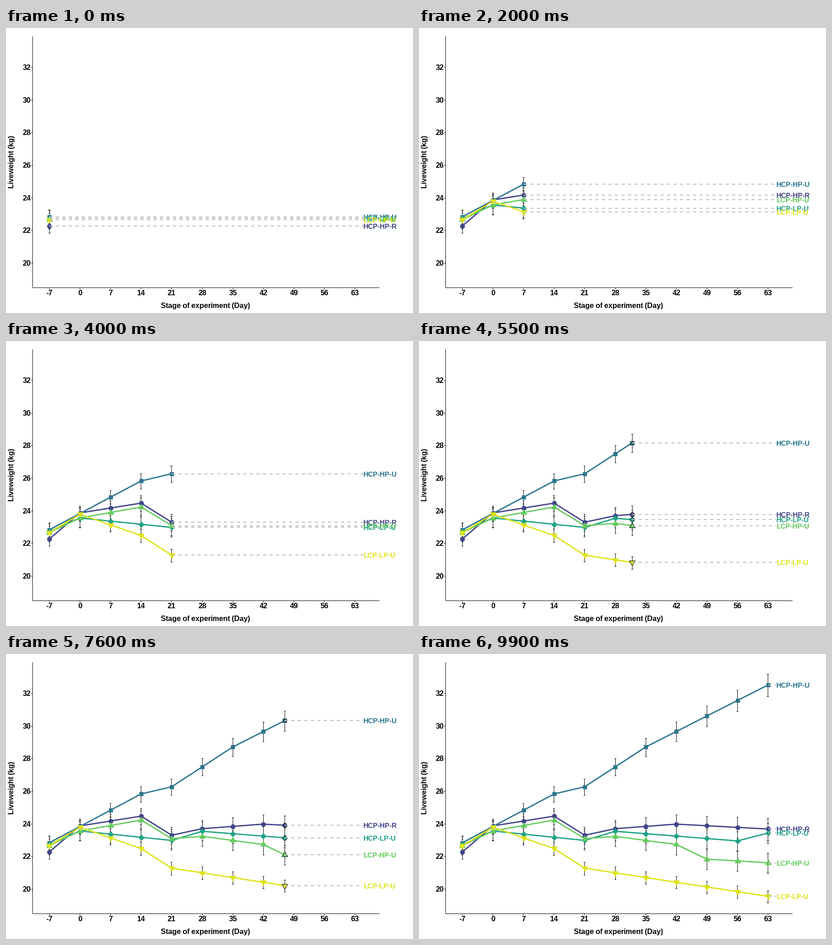
A matplotlib script for the animation above (10 s loop, 894 by 626 pixels).

```python
import numpy as np
import matplotlib.pyplot as plt
from matplotlib.animation import FuncAnimation
from matplotlib.path import Path

W, H, DPI = 894, 626, 64
PX = 72 / DPI  # points per pixel
FRAMES, INTERVAL = 100, 100
GREY = "#bebebe"
LABEL_X = 785
RADIUS = 4.74  # marker radius in pixels

plt.rcParams.update({
    "font.family": "Liberation Sans",
    "font.weight": "bold",
    "text.hinting": "native",
    "text.hinting_factor": 1,
    "text.kerning_factor": 6,
})

fig = plt.figure(figsize=(W / DPI, H / DPI), dpi=DPI, facecolor="white")
ax = fig.add_axes([0, 0, 1, 1])
# Data units are pixels; the offset makes whole numbers snap to pixel centres.
ax.set_xlim(-0.45, W - 0.45)
ax.set_ylim(H - 0.55, -0.55)
ax.axis("off")

WEEKS = np.arange(11)
KEYS = (WEEKS * (FRAMES - 1) + 5) // 10  # frame on which each week is reached


def week_x(week):
    return 95 + 67.12 * week


def kg_y(kg):
    return 515 - 35.83 * (kg - 20)


def triangle(sign):
    angles = np.pi / 2 + np.arange(4) * 2 * np.pi / 3
    return Path(np.column_stack([np.cos(angles), sign * np.sin(angles)]),
                closed=True)


# name, marker, size, {week: mean kg} turning points, error at start and end
GROUPS = [
    ("HCP-HP-R", "o", 2 * RADIUS,
     {0: 22.26, 1: 23.85, 3: 24.45, 4: 23.28, 5: 23.68, 7: 23.96, 10: 23.66},
     (0.42, 0.66)),
    ("HCP-HP-U", "s", np.sqrt(np.pi) * RADIUS,
     {0: 22.82, 3: 25.81, 4: 26.25, 6: 28.69, 10: 32.49}, (0.38, 0.68)),
    ("HCP-LP-U", "D", np.sqrt(np.pi) * RADIUS,
     {0: 22.71, 1: 23.54, 4: 22.96, 5: 23.52, 9: 22.93, 10: 23.41},
     (0.55, 0.60)),
    ("LCP-HP-U", triangle(1), 3.11 * RADIUS,
     {0: 22.65, 1: 23.54, 3: 24.21, 4: 23.07, 5: 23.21, 7: 22.71, 8: 21.81,
      10: 21.59}, (0.57, 0.62)),
    ("LCP-LP-U", triangle(-1), 3.11 * RADIUS,
     {0: 22.65, 1: 23.77, 3: 22.46, 4: 21.26, 10: 19.53}, (0.42, 0.36)),
]


def line(xs=(), ys=(), width=1, color="black", **kw):
    return ax.plot(xs, ys, lw=width * PX, color=color,
                   solid_capstyle="butt", dash_capstyle="butt", **kw)[0]


def label(x, y, text, size=16, ha="center", **kw):
    return ax.text(x, y, text, fontsize=size * PX, ha=ha, va="baseline", **kw)


def draw_axes():
    line([58, 58], [17, 569], snap=True)
    line([58, 820], [569, 569], snap=True)
    for kg in range(20, 33, 2):
        y = round(kg_y(kg))
        line([55, 58], [y, y], snap=True)
        label(54, y + 6, str(kg), ha="right")
    for week in WEEKS:
        x = round(week_x(week))
        line([x, x], [569, 572], snap=True)
        label(x, 586, str(7 * week - 7))
    label(438, 614, "Stage of experiment (Day)")
    label(17, 293, "Liveweight (kg)", rotation=90, rotation_mode="anchor")


def error_path(xs, ys, half):
    """One I-shaped bar per point, separated by gaps."""
    xs, top, low = np.round(xs), np.round(ys - half), np.round(ys + half)
    gap = np.full_like(xs, np.nan)
    l, r = xs - 2, xs + 2
    px = np.stack([l, r, gap, xs, xs, gap, l, r, gap], axis=1)
    py = np.stack([top, top, gap, top, low, gap, low, low, gap], axis=1)
    return px.ravel(), py.ravel()


class Series:
    def __init__(self, order, name, marker, size, turns, errors, color):
        self.means = np.interp(WEEKS, list(turns), list(turns.values()))
        self.errors = errors
        z = order / 10
        dots = dict(width=0, color=color, marker=marker, ls="none",
                    markersize=size * PX, markeredgewidth=PX)
        self.bars = line(snap=True, zorder=1 + z)
        self.path = line(width=2.85, color=color, zorder=2 + z,
                         solid_joinstyle="round")
        self.dots = line(zorder=3 + z, **dots)
        self.head = line(zorder=3.05 + z, markeredgecolor="black", **dots)
        self.guide = line(width=2, color=GREY, zorder=4, snap=True,
                          ls=(0, (3.575, 3.575)))
        self.tag = label(LABEL_X, 0, name, 15, "left", color=color, zorder=5 + z)

    def update(self, frame):
        done = WEEKS[KEYS <= frame]
        now = np.interp(frame, KEYS, WEEKS)
        weeks = np.append(done, now)
        xs, ys = week_x(weeks), kg_y(np.interp(weeks, WEEKS, self.means))
        half = 35.83 * np.interp(weeks, [0, 10], self.errors)
        x, y = xs[-1], ys[-1]
        self.bars.set_data(*error_path(xs, ys, half))
        self.path.set_data(xs, ys)
        self.dots.set_data(xs[:-1], ys[:-1])
        self.head.set_data([x], [y])
        self.head.set_visible(frame not in KEYS)
        self.guide.set_data([x, LABEL_X], [y, y])
        self.tag.set_y(y + 6)


draw_axes()
COLORS = plt.get_cmap("viridis")(np.linspace(0.2, 0.95, len(GROUPS)))
series = [Series(i, *g, c) for i, (g, c) in enumerate(zip(GROUPS, COLORS))]


def update(frame):
    for s in series:
        s.update(frame)
    return []


anim = FuncAnimation(fig, update, frames=FRAMES, interval=INTERVAL,
                     init_func=lambda: update(0), repeat=True, blit=False)
plt.show()
```
